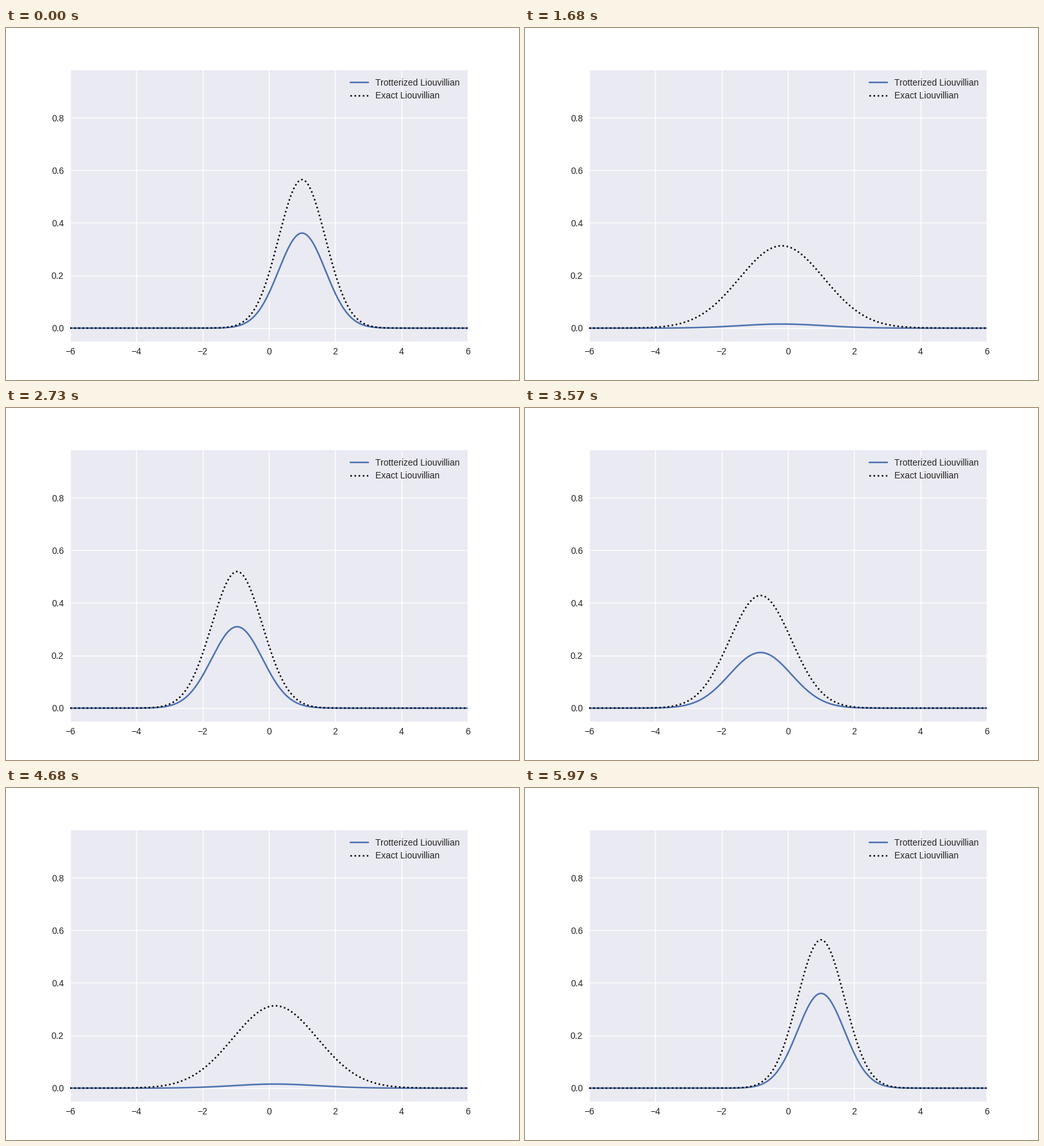
A matplotlib script for the animation above (6000 ms loop, 800 px wide and 550 px high).

```python
import matplotlib.pyplot as plt
import numpy as np
from matplotlib.animation import FuncAnimation

plt.style.use("seaborn-v0_8")
plt.rcParams["font.sans-serif"] = ["Liberation Sans", "DejaVu Sans"]

FRAMES = 200
INTERVAL = 30
SPREAD = 10 / 3  # squared width ratio after a quarter period
LAG = 0.005      # phase lag of the Trotter weight

x = np.linspace(-6, 6, 601)

# Trotter weight as a smooth function of cos(2 * angle)
weight = np.polynomial.Polynomial.fit(
    [-0.951, -0.368, 0.426, 0.809, 0.998],
    [0.0495, 0.227, 0.494, 0.596, 0.640],
    4,
)


def packet(phase):
    """Gaussian packet swinging and breathing in a harmonic well."""
    c, s = np.cos(2 * np.pi * phase), np.sin(2 * np.pi * phase)
    width2 = c**2 + SPREAD * s**2
    return np.exp(-((x - c) ** 2) / width2) / np.sqrt(np.pi * width2)


fig, ax = plt.subplots(figsize=(8, 5.5), dpi=100)
ax.set_xlim(-6, 6)
ax.set_ylim(-0.05, 0.98)
trotter, = ax.plot(x, packet(0), color="#4C72B0", label="Trotterized Liouvillian")
exact, = ax.plot(x, packet(0), ":", color="black", label="Exact Liouvillian")
ax.legend(loc="upper right")


def update(i):
    phase = i / FRAMES
    density = packet(phase)
    exact.set_ydata(density)
    trotter.set_ydata(weight(np.cos(4 * np.pi * (phase - LAG))) * density)
    return trotter, exact


anim = FuncAnimation(fig, update, frames=FRAMES, interval=INTERVAL,
                     repeat=True, repeat_delay=0, blit=False)
plt.show()
```
